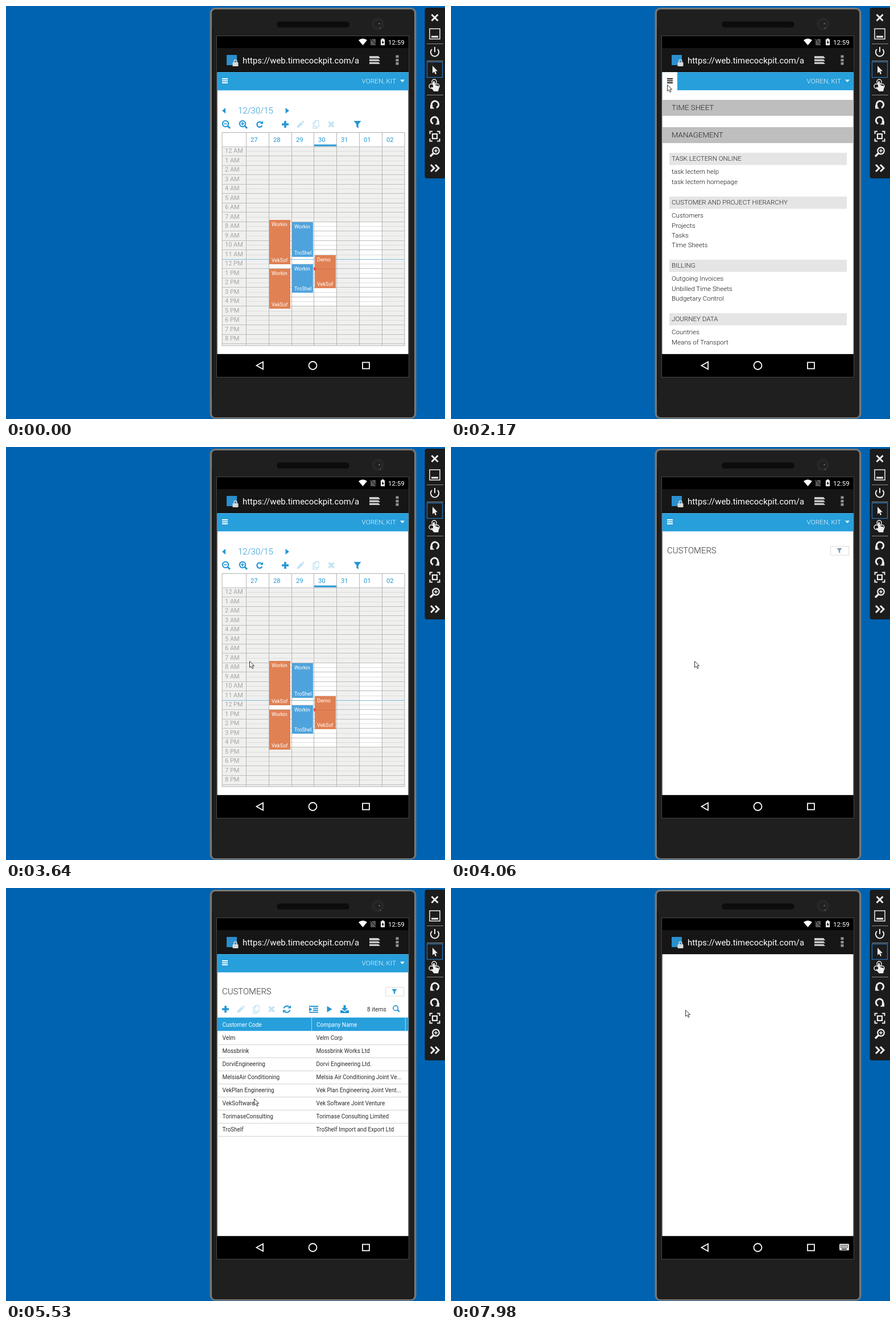
Recreate the animation shown at these times as an HTML page. Size 772x726 px, loop 8000 ms.

```html
<!DOCTYPE html>
<html lang="en">
<head>
<meta charset="utf-8">
<title>Customer list on a phone</title>
<style>
html, body { margin: 0; width: 100%; height: 100%; overflow: hidden; background: #0063b1; }
svg { display: block; width: 772px; height: 726px; font-family: Roboto, sans-serif; }
text { white-space: pre; }
.thin { font-weight: 300; }
.line { fill: none; stroke: currentColor; }
.fill { fill: currentColor; }
.blue { color: #2496d4; }
.anim { animation: 8s step-end -5ms infinite; }

.calendar { animation-name: calendar; }
.menu { animation-name: menu; }
.customers { animation-name: customers; }
.table { animation-name: table; }
.header { animation-name: header; }
.row { animation-name: row; }
.edit { animation-name: edit; }
.funnel { animation-name: funnel; }
.keys { animation-name: keys; }
.cursor { animation-name: cursor; }

@keyframes calendar { 0%, 45.5% { opacity: 1 } 27.125%, 50.75%, 100% { opacity: 0 } }
@keyframes menu { 0%, 45.5%, 100% { opacity: 0 } 27.125% { opacity: 1 } }
@keyframes customers { 0%, 92.75%, 100% { opacity: 0 } 50.75% { opacity: 1 } }
@keyframes table { 0% { opacity: 0 } 55.125%, 100% { opacity: 1 } }
@keyframes header { 0% { opacity: 1 } 92.75%, 100% { opacity: 0 } }
@keyframes row { 0% { opacity: 0 } 77%, 100% { opacity: 1 } }
@keyframes edit { 0% { color: #c4e3f4 } 77%, 100% { color: #2496d4 } }
@keyframes funnel { 0% { color: #7d9fae } 55.125%, 100% { color: #2496d4 } }
@keyframes keys { 0% { opacity: 0 } 99.75%, 100% { opacity: 1 } }
/* The pointer advances once every 70 ms. */
@keyframes cursor {
  0% { transform: translate(693px, 740px) }
  7% { transform: translate(693px, 713px); animation-timing-function: steps(8) }
  14% { transform: translate(452px, 252px); animation-timing-function: steps(3) }
  16.625% { transform: translate(417px, 199px); animation-timing-function: steps(4) }
  20.125% { transform: translate(389px, 153px); animation-timing-function: steps(3) }
  22.75% { transform: translate(380px, 138px) }
  30.625% { transform: translate(380px, 138px); animation-timing-function: steps(5) }
  35% { transform: translate(402px, 272px); animation-timing-function: steps(5) }
  39.375% { transform: translate(428px, 376px) }
  69.125% { transform: translate(436px, 370px); animation-timing-function: steps(5) }
  73.5% { transform: translate(443px, 334px) }
  81.375% { transform: translate(443px, 334px); animation-timing-function: steps(4) }
  84.875% { transform: translate(391px, 238px); animation-timing-function: steps(3) }
  87.5% { transform: translate(411px, 214px) }
  89.25%, 100% { transform: translate(412px, 214px) }
}
</style>
</head>
<body>
<svg viewBox="0 0 772 726">
  <defs>
    <path id="plus" class="line" stroke-width="3.6" d="M0-6V6M-6 0H6"/>
    <path id="pencil" class="fill" d="M-6.500 6.500l1-4.200 6.800-6.800 3.200 3.200-6.800 6.800zM2.200-5.300l1-1q.8-.6 1.600.1l1.600 1.600q.7.800 0 1.500l-1 1z"/>
    <path id="copy" class="line" stroke-width="1.300" d="M-1-6.500H5V4H-2.500V-5zM-2.500-3.500H-5V7H2V4M-2.500-4H-.5V-6.500"/>
    <path id="cross" class="line" stroke-width="3.6" d="M-4.500-4.500L4.500 4.500M4.500-4.500L-4.500 4.500"/>
    <path id="filter" class="fill" d="M-6.500-6H6.500L1.700 0V7L-1.700 4.300V0z"/>
    <g id="lens" class="line"><circle cx="-1" cy="-1" r="5.200" stroke-width="2"/><path stroke-width="3" d="M3 3L7 7"/></g>
    <g id="reload"><path class="line" stroke-width="2.300" d="M3.500-2.800A4.600 4.600 0 1 0 4.300 2"/><path class="fill" d="M6-6V-.7H.7z"/></g>
    <g id="sync"><path class="line" stroke-width="2.200" d="M-5.300-1.500A5.500 5.500 0 0 1 4-4M5.300 1.500A5.500 5.500 0 0 1-4 4"/><path class="fill" d="M7-7V-1.500H1.500zM-7 7V1.500H-1.500z"/></g>
    <path id="burger" class="line" stroke-width="1.900" d="M-5-3.500H5M-5 0H5M-5 3.500H5"/>
    <g id="turn"><path class="line" stroke-width="3" d="M-4.500 4A6.200 6.200 0 1 1 3 6"/><path class="fill" d="M-8 7.500V.5L-.5 7.500z"/></g>
  </defs>

  <!-- phone -->
  <rect x="358.500" y="3" width="363" height="722.500" rx="9" fill="#777775"/>
  <rect x="362" y="6" width="356" height="717" rx="6" fill="#1f1f1f"/>
  <path d="M363.500 40V690" stroke="#151515" stroke-width="2"/>
  <rect x="476.500" y="27.500" width="127" height="10" rx="4.500" fill="#0c0c0c" stroke="#111"/>
  <circle cx="654" cy="31.500" r="11" fill="#272727"/>
  <circle cx="654" cy="31.500" r="6" fill="#202020"/>
  <circle cx="656.500" cy="31" r="1.200" fill="#777"/><circle cx="658" cy="39" r="1.200" fill="#555"/>
  <rect x="370.500" y="52.500" width="338" height="600" stroke="#474747"/>
  <rect x="371.500" y="74" width="336" height="41" fill="#161616"/>
  <path fill="#fff" d="M620 60Q627.500 54.500 635 60L627.500 69z"/>
  <path fill="#555" d="M644 58H650V69H641V61z"/><path stroke="#111" stroke-width="1.500" d="M641 58L651 69"/><path stroke="#777" d="M640 58L650 69"/>
  <path fill="#fff" d="M661 57H664V58.500H666V69H659V58.500H661z"/><path fill="#000" d="M663 60L660.500 64.500H662.300V67.500L665 63H663z"/>
  <text x="672" y="67.500" font-size="11.600" fill="#fff">12:59</text>
  <rect x="388" y="86" width="18" height="18" fill="#2a8fcd"/>
  <rect x="398.500" y="99" width="10" height="7" rx="1" fill="#d8d8d8"/><path d="M401 99V97a2.500 2.500 0 0 1 5 0V99" fill="none" stroke="#d8d8d8" stroke-width="1.500"/>
  <text x="416" y="100.700" font-size="14.900" fill="#fff">https://web.timecockpit.com/a</text>
  <path fill="#c9c9c9" d="M639 88H655L658 92H639zM639 93.500H655L658 97H639zM639 98.500H655L658 102H639z"/>
  <path fill="#929292" d="M685.500 86.500h5v4.500h-5zM685.500 93h5v4.500h-5zM685.500 99h5v4.500h-5z"/>
  <rect x="371.500" y="116.300" width="336" height="495.500" fill="#fff"/>
  <g fill="none" stroke="#fff" stroke-width="1.800">
    <path d="M452 625.500V638.500L440.500 632z"/><circle cx="539.500" cy="632" r="7"/><rect x="627" y="626.500" width="12" height="11"/>
  </g>
  <g class="anim keys">
    <rect x="683" y="625.500" width="17" height="11.500" rx="1.500" fill="#e4e4e4"/>
    <path stroke="#000" stroke-width="1.500" stroke-dasharray="1.500 1.300" d="M685 628.500H698.500M685 631.500H698.500"/><path stroke="#000" stroke-width="1.500" d="M687 634.700H696"/>
  </g>

  <g class="anim header">
    <rect x="371.500" y="116.300" width="336" height="32" fill="#279fdb"/>
    <use href="#burger" x="385" y="131.500" color="#fff"/>
    <text x="686" y="135.800" class="thin" font-size="11.800" text-anchor="end" fill="#eef8fd">VOREN, KIT</text>
    <path fill="#eef8fd" d="M693 129.500H701L697 134z"/>
  </g>

  <g class="anim calendar" id="calendar"></g>
  <g class="anim menu" id="menu"></g>
  <g class="anim customers" id="customers"></g>

  <!-- emulator tools -->
  <rect x="736.500" y="3" width="40" height="300" rx="4" fill="#1c1c1c"/>
  <path stroke="#8c8c8c" d="M740 66.500H769M740 96.500H769M740 156.500H769"/>
  <rect x="740.500" y="98.500" width="27" height="27" fill="none" stroke="#2673b8" stroke-width="1.300"/>
  <g color="#eee">
    <path class="line" stroke-width="3" d="M748.500 15L759.500 26M759.500 15L748.500 26"/>
    <rect class="line" x="745" y="40" width="18" height="18" stroke="#999" stroke-width="1.500"/><path class="line" stroke-width="3" d="M748 54H760"/>
    <path class="line" stroke-width="2" d="M749 76A7.200 7.200 0 1 0 759 76M754 72V81"/>
    <path class="fill" d="M750 105V118L753 115.500L755 120L757 119L755 114.500H759z"/>
    <g class="line" stroke="#777" stroke-width="1.500"><circle cx="753" cy="133" r="4"/><circle cx="748" cy="141" r="4"/><circle cx="758" cy="141" r="4"/></g>
    <path class="fill" d="M751 133q1.500-2 3 0V139L760 140.500Q762 141.500 761.500 144L760 150H752.500L747.500 143.500Q748 141.500 751 143.500z"/>
    <use href="#turn" x="754" y="173"/>
    <use href="#turn" transform="translate(754 201) scale(-1 1)"/>
    <path class="line" stroke-width="2" d="M745.500 225V220.500H750M758 220.500H762.500V225M762.500 233V237.500H758M750 237.500H745.500V233"/><rect class="line" x="750" y="225" width="8" height="8" stroke-width="2.200"/>
    <g transform="translate(754 257) scale(-1 1)"><circle class="line" cx="-2" cy="-2.500" r="5.800" stroke-width="2.200"/><path class="line" stroke-width="3.400" d="M2 1.500L8 7.500"/><path class="line" stroke-width="1.600" d="M-5-2.500H1M-2-5.500V.5"/></g>
    <path class="line" stroke-width="3" d="M747 279L753 285L747 291M755 279L761 285L755 291"/>
  </g>

  <g class="anim cursor"><path d="M.5.700V11.700L3.200 9.300L5.200 13.500L7 12.700L5.100 8.600H8.600z" fill="#fff" stroke="#222" stroke-width=".9"/></g>
</svg>

<script>
const left = 371.5, width = 336, right = left + width;
const rect = (x, y, w, h, fill) => `<rect x="${x}" y="${y}" width="${w}" height="${h}" fill="${fill}"/>`;
const text = (x, y, size, fill, str, cls = '') =>
  `<text x="${x}" y="${y}" font-size="${size}" fill="${fill}" class="${cls}">${str}</text>`;
const icon = (id, x, y, scale = 1) => `<use href="#${id}" transform="translate(${x} ${y}) scale(${scale})"/>`;
const hline = (y, color, x1 = 380, x2 = 701) => rect(x1, Math.round(y), x2 - x1, 1, color);
const put = (id, html) => { document.getElementById(id).innerHTML = html; };

function calendar() {
  const top = 247, pitch = 16.5, colW = 39.8;
  const colX = i => Math.round(422 + i * colW);
  const blue = '#4fa3dc', orange = '#e08154';
  let s = `<g class="blue"><path class="fill" d="M386 179V189L380 184zM491.500 179V189L498 184z"/>
    ${text(408, 189.300, 15, '#2496d4', '12/30/15', 'thin')}
    ${icon('lens', 387, 208)}${icon('lens', 417, 208)}
    <path class="line" stroke-width="1.600" d="M383 207H389M413 207H419M416 204V210"/>
    ${icon('reload', 446, 208)}${icon('plus', 491, 208)}${icon('filter', 618, 208)}</g>
    <g color="#c4e3f4">${icon('pencil', 518, 208)}${icon('copy', 545, 208)}${icon('cross', 572, 208)}</g>`;
  s += rect(380, top, 321, 350, '#f0f0ef');
  for (const c of [1, 2, 3, 5]) s += rect(colX(c), top + 8 * pitch, colW, 9 * pitch, '#fff');
  for (let h = 0; h <= 21; h++) {
    const y = top + h * pitch;
    s += hline(y - .5, '#bdbdbd');
    if (h > 20) break;
    s += hline(y + 8, '#dcdcdc', 422);
    s += text(385, y + 11.300, 11, '#a6a6a6', `${h % 12 || 12} ${h < 12 ? 'AM' : 'PM'}`);
  }
  ['27', '28', '29', '30', '31', '01', '02'].forEach((day, i) => {
    s += rect(colX(i), 222, 1, 375, '#b4b4b4') + text(colX(i) + 8, 239.300, 11.300, '#2496d4', day);
  });
  s += '<rect x="380" y="222.500" width="321" height="374.500" fill="none" stroke="#b0b0b0"/>';
  s += rect(542, 243.500, 39, 3, '#2496d4');
  const events = [
    [463, 376, 454, orange, 'Workin', 'VekSof'], [463, 462, 532, orange, 'Workin', 'VekSof'],
    [503, 380, 441, blue, 'Workin', 'TroShel'], [503, 454, 504, blue, 'Workin', 'TroShel'],
    [543, 438, 496, orange, 'Demo', 'VekSof']
  ];
  s += hline(445, '#82bbd8');
  for (const [x, y, end, color, title, client] of events)
    s += rect(x, y, 37, end - y, color) + text(x + 4, y + 10.500, 9, '#fff', title) + text(x + 4, end - 4.300, 9, '#fff', client);
  return s + '<path fill="#dc4f43" d="M541 458.500L547 462L541 465.500z"/>' + hline(461.500, '#dc6b4c', 543, 580);
}

function menu() {
  let s = rect(left, 148.300, width, 463, '#fff') + rect(left, 116.300, 26.500, 32, '#fff')
    + `<g color="#222">${icon('burger', 385, 131.500)}</g>`;
  for (const [y, label] of [[165, 'TIME SHEET'], [213, 'MANAGEMENT']])
    s += rect(left, y, width, 28, '#bebebe') + text(388, y + 18, 13.300, '#222', label, 'thin');
  const sections = [
    [258, 'TASK LECTERN ONLINE', 'task lectern help', 'task lectern homepage'],
    [335, 'CUSTOMER AND PROJECT HIERARCHY', 'Customers', 'Projects', 'Tasks', 'Time Sheets'],
    [446, 'BILLING', 'Outgoing Invoices', 'Unbilled Time Sheets', 'Budgetary Control'],
    [540, 'JOURNEY DATA', 'Countries', 'Means of Transport']
  ];
  for (const [y, title, ...items] of sections) {
    s += rect(384, y, 312, 21.500, '#e5e5e5') + text(388, y + 14.400, 11.600, '#222', title, 'thin');
    items.forEach((item, i) => { s += text(388, y + 37.300 + i * 17.300, 11.600, '#111', item, 'thin'); });
  }
  return s;
}

function customers() {
  const rows = [
    ['Velm', 'Velm Corp'],
    ['Mossbrink', 'Mossbrink Works Ltd'],
    ['DorviEngineering', 'Dorvi Engineering Ltd.'],
    ['MelsiaAir Conditioning', 'Melsia Air Conditioning Joint Ve...'],
    ['VekPlan Engineering', 'Vek Plan Engineering Joint Vent...'],
    ['VekSoftware', 'Vek Software Joint Venture'],
    ['TorimaseConsulting', 'Torimase Consulting Limited'],
    ['TroShelf', 'TroShelf Import and Export Ltd']
  ];
  let s = text(380, 187.300, 14.900, '#333', 'CUSTOMERS', 'thin')
    + '<rect x="667.500" y="174.500" width="32" height="15.500" fill="#fff" stroke="#ddd"/>'
    + `<g class="anim funnel">${icon('filter', 683, 182, .72)}</g>`;
  s += `<g class="anim table"><g class="blue">${icon('plus', 386, 213)}${icon('sync', 494, 213)}${icon('lens', 686, 212, .82)}
    <path class="line" stroke-width="2" d="M533 208H549M540 211.500H549M540 215H549M533 218.500H549"/>
    <path class="fill" d="M533 209.500L538.500 213.300L533 217zM564.500 207.500V218.500L573.500 213zM593.500 206H597.500V211H601L595.500 216.500L590 211H593.500z"/>
    <path class="fill" d="M588 215H592L595.500 218L599 215H603V220H588z"/></g>
    <g class="anim edit">${icon('pencil', 413, 213)}${icon('copy', 440, 213)}${icon('cross', 467, 213)}</g>
    ${text(635, 216.700, 10.200, '#333', '8 items')}
    ${rect(left, 227.700, width, 23.500, '#279fdb')}${rect(537, 228, 1, 23, '#a5d7f0')}${rect(702, 228, 1, 23, '#a5d7f0')}
    ${text(380.500, 243.500, 10, '#fff', 'Customer Code')}${text(546, 243.500, 10, '#fff', 'Company Name')}
    <g class="anim row">${rect(left, 321, width, 23, '#d2eaf6')}</g>`;
  rows.forEach(([code, name], i) => {
    const y = 251.500 + i * 23.100;
    s += text(380.500, y + 15.200, 10, '#2b2b2b', code) + text(545.500, y + 15.200, 10, '#2b2b2b', name)
      + hline(y + 23, '#d2d2d2', left, right);
  });
  return s + '</g>';
}

put('calendar', calendar());
put('menu', menu());
put('customers', customers());
</script>
</body>
</html>
```
